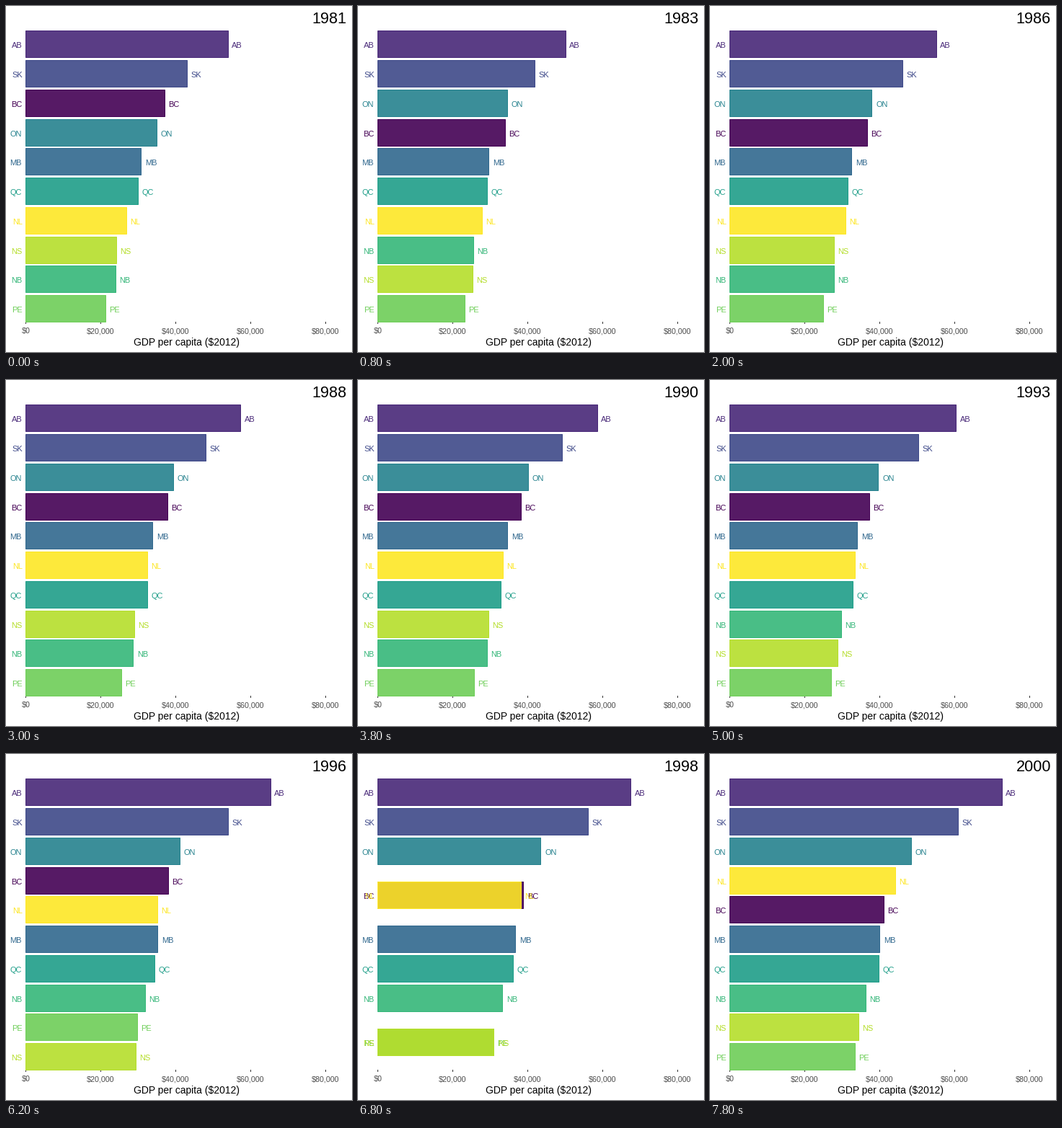
These frames come from a looping animation (480 by 480 pixels, 8000 ms). A matplotlib script:

```python
import numpy as np
import matplotlib.pyplot as plt
from matplotlib.animation import FuncAnimation
from matplotlib.patches import Rectangle

SIZE, DPI = 480, 100
X0, PX_PER_DOLLAR = 27, 0.0052
TOP, PITCH, BAR_H = 34.65, 40.79, 37
FIRST_YEAR, LAST_YEAR = 1981, 2000
HOLD = 14          # the state reached here rests for one extra frame
LABEL_GAP = 0.3    # space beside a label, as a share of its width

# Bar lengths at the turning points; provinces run west to east.
TURNS = [1981, 1983, 1990, 1996, 2000]
SWINGS = [-0.03, 0.025, -0.025, -0.01]   # shared bust or boom in between
LENGTHS = {
    "BC": [194, 178, 200, 199, 215],
    "AB": [282, 262, 306, 341, 379],
    "SK": [225, 219, 257, 282, 318],
    "MB": [161, 155, 181, 184, 209],
    "ON": [183, 181, 210, 215, 253],
    "QC": [157, 153, 172, 180, 208],
    "NB": [126, 134, 153, 167, 190],
    "PE": [112, 122, 135, 156, 175],
    "NS": [127, 133, 155, 154, 180],
    "NL": [141, 146, 175, 184.4, 231],
}


def length_at(points, year):
    phase = np.interp(year, TURNS, range(len(TURNS)))
    swing = SWINGS[min(int(phase), len(SWINGS) - 1)]
    wave = abs(np.sin(np.pi * phase))
    return np.interp(year, TURNS, points) * (1 + swing * wave)


years = range(FIRST_YEAR, LAST_YEAR + 1)
lengths = np.array([[length_at(p, y) for y in years]
                    for p in LENGTHS.values()])
ranks = np.argsort(np.argsort(-lengths, axis=0), axis=0)

plt.rcParams["font.family"] = "Liberation Sans"
fig = plt.figure(figsize=(SIZE / DPI, SIZE / DPI), dpi=DPI, facecolor="white")
ax = fig.add_axes([0, 0, 1, 1])
ax.set_xlim(0, SIZE)
ax.set_ylim(SIZE, 0)
ax.axis("off")


def pt(px):
    return px * 72 / DPI


def put(x, y, s, px, color="black", ha="left"):
    return ax.text(x, y, s, fontsize=pt(px), color=color, ha=ha,
                   va="baseline", zorder=4)


for dollars in range(0, 80001, 20000):
    x = X0 + dollars * PX_PER_DOLLAR
    ax.plot([x + 0.5] * 2, [438, 441], color="#333333", lw=pt(1),
            solid_capstyle="butt", snap=False, zorder=1)
    put(x + 0.3, 454, f"${dollars:,}", 10.7, "#4d4d4d", "center")
put(250.5, 471, "GDP per capita ($2012)", 13.85, ha="center")
year_text = put(473, 23.5, "", 21.6, ha="right")


class Bar:
    def __init__(self, name, color, z):
        # Strokes sit on pixel centres, so snapping stays off.
        self.rect = Rectangle((X0 + 0.5, 0), 0, BAR_H, lw=pt(1),
                              facecolor=(*color[:3], 0.9), edgecolor=color,
                              joinstyle="miter", snap=False,
                              zorder=2 + z / 100)
        ax.add_patch(self.rect)
        self.tag = put(0, 0, name, 11, color)
        self.gap = LABEL_GAP * self.tag.get_window_extent().width
        self.side = put(X0 - self.gap, 0, name, 11, color, "right")

    def place(self, length, rank):
        y = TOP + PITCH * rank
        base = y + BAR_H / 2 + 5
        self.rect.set_y(np.floor(y) + 0.5)
        self.rect.set_width(np.round(length) - 1)
        self.tag.set_position((X0 + length + self.gap, base))
        self.side.set_y(base)


colors = plt.get_cmap("viridis")(np.linspace(0, 1, len(LENGTHS)))
bars = [Bar(n, c, i) for i, (n, c) in enumerate(zip(LENGTHS, colors))]


def update(frame):
    state = (frame - (frame > HOLD)) / 2
    i = int(state)
    j = min(i + 1, len(years) - 1)
    t = state - i
    for k, bar in enumerate(bars):
        bar.place((1 - t) * lengths[k, i] + t * lengths[k, j],
                  (1 - t) * ranks[k, i] + t * ranks[k, j])
    year_text.set_text(str(years[i if t < 0.5 else j]))
    return []


anim = FuncAnimation(fig, update, frames=40, interval=200,
                     repeat=True, repeat_delay=0, blit=False)
plt.show()
```
